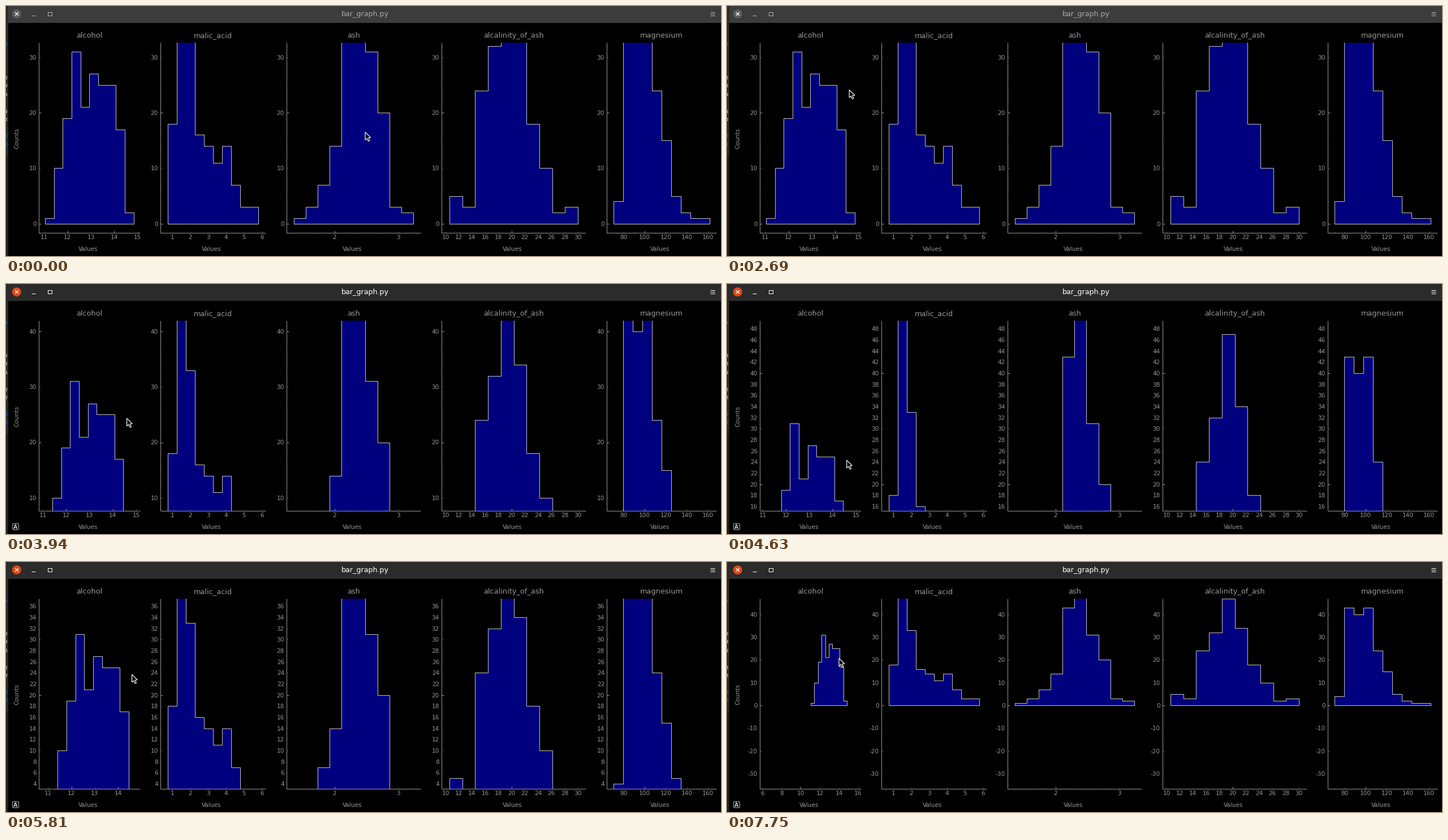
A matplotlib script for the animation above (8 s loop, 1264 by 443 pixels).

```python
import math

import numpy as np
import matplotlib.pyplot as plt
from matplotlib.animation import FuncAnimation
from matplotlib.collections import LineCollection
from matplotlib.patches import Circle, FancyBboxPatch, Polygon, Rectangle

W, H, DPI = 1264, 443, 64
FRAMES, INTERVAL = 200, 40
TICK_MS = 62.5                 # the screen is refreshed 16 times a second
PT = 72 / DPI                  # points per pixel
UI = 0.878                     # display scale of the window
TOP, BOTTOM = 64.5, 402
ZERO_Y, COUNT_PX = 385.7, 9.833
GREY = "#969696"
SMALL, TITLE = 12 * UI, 14.67 * UI

GRAB, RELEASE = 50, 103        # ticks of the drag
ZOOM_AT = (199, 169)
WHEEL_TICKS = range(118, 125, 3)
LAG = 0.3                      # the pointer is drawn slightly late

# pointer moves: start tick, end tick, x, y
START = (635, 223)
MOVES = [
    (15, 28, 443, 226), (29, 43, 216, 148),
    (50, 63, 213.5, 239.5), (63, 74, 211.5, 313.7), (74, 80, 212, 341),
    (82, 93, 222.8, 194.7), (93, 103, 221.3, 138.8),
    (111, 114, 198, 166), (117, 124, 198, 170),
]

# title, axis left and right, inset of the data, data range, counts per bin
PLOTS = [
    ("alcohol", 58, 236.5, 11, (11.03, 14.83),
     [1, 10, 19, 31, 21, 27, 25, 25, 17, 2]),
    ("malic_acid", 273, 459, 12.6, (0.74, 5.8),
     [18, 59, 33, 16, 14, 11, 14, 7, 3, 3]),
    ("ash", 496, 732.6, 12.7, (1.36, 3.23),
     [1, 3, 7, 14, 43, 54, 31, 20, 3, 2]),
    ("alcalinity_of_ash", 770, 1025, 14.1, (10.6, 30),
     [5, 3, 24, 32, 47, 34, 18, 10, 2, 3]),
    ("magnesium", 1062, 1256, 11.7, (70, 162),
     [4, 43, 40, 43, 24, 15, 5, 2, 1, 1]),
]

fig = plt.figure(figsize=(W / DPI, H / DPI), dpi=DPI, facecolor="black")
ax = fig.add_axes([0, 0, 1, 1])
ax.set_xlim(0, W)
ax.set_ylim(H, 0)
ax.axis("off")


def hand(k):
    """Pointer position: steady through waypoints, slowing before a stop."""
    pos = np.array(START, float)
    for n, (begin, end, x, y) in enumerate(MOVES):
        if k <= begin:
            break
        u = min(1, (k - begin) / (end - begin))
        if n + 1 == len(MOVES) or MOVES[n + 1][0] > end:
            u *= 2 - u
        pos += (np.array((x, y)) - pos) * u
    return pos


def write(x, y, s, px, color=GREY, ha="center", **kw):
    return ax.text(x, y, s, fontsize=px * PT, color=color, ha=ha,
                   va="baseline", family="DejaVu Sans", **kw)


def segments(lines, color, width=1.0, z=3):
    art = LineCollection(lines, colors=color, linewidths=width * PT, zorder=z)
    ax.add_collection(art, autolim=False)
    return art


def rect(x, y, w, h, color, z=1):
    return ax.add_patch(Rectangle((x, y), w, h, fc=color, lw=0, zorder=z))


def tick_steps(span, size):
    """Spacing of the tick levels, coarse to fine."""
    best = span / max(2, math.log(size / UI))
    unit = 10 ** math.floor(math.log10(best))
    steps = [unit * m for m in (1, 2, 10, 20, 100)]
    first = 1 if steps[1] <= best else 0
    levels = [steps[first + 2], steps[first + 1]]
    if span / steps[first] <= 20:
        levels.append(steps[first])
    return levels


def too_dense(shown, fill):
    return any(shown >= n and fill >= 0.8 - n / 10 for n in (0, 2, 4, 6))


def text_width(s):
    return 6.7 * len(s.replace(".", "")) + 3.3 * s.count(".")


class Axis:
    """Axis line with inward ticks; labels come from a pool of texts."""

    def __init__(self, pos, start, end, upright):
        self.pos, self.start, self.end = pos, start, end
        self.upright = upright
        segments([[self.point(start), self.point(end)]], GREY)
        self.ticks = segments([], GREY)
        self.pool = []

    def point(self, at, inward=0):
        if self.upright:
            return self.pos + inward, at
        return at, self.pos - inward

    def label(self, n, at, s):
        if n == len(self.pool):
            self.pool.append(write(0, 0, "", SMALL,
                                   ha="right" if self.upright else "center"))
        text = self.pool[n]
        text.set_text(s)
        text.set_visible(True)
        text.set_position((self.pos - 4, at + 3.9) if self.upright
                          else (at, self.pos + 11))

    def update(self, origin, scale):
        lo, hi = sorted(((self.start - origin) / scale,
                         (self.end - origin) / scale))
        size = abs(self.end - self.start)
        seen, lines, colors = set(), [], []
        shown, used, labelling = 0, 0, True
        for level, step in enumerate(tick_steps(hi - lo, size)):
            values = [round(j * step, 6) for j in
                      range(math.ceil(lo / step), math.floor(hi / step) + 1)]
            values = [v for v in values if v not in seen]
            seen.update(values)
            spots = [origin + v * scale for v in values]
            names = [f"{v:g}" for v in values]
            length = 5 * UI / (1 + level / 2)
            lines += [[self.point(p), self.point(p, length)] for p in spots]
            colors += [(0.59, 0.59, 0.59, 1 / (level + 1))] * len(spots)
            used += sum(10 if self.upright else text_width(s) for s in names)
            if level and too_dense(shown, used / size):
                labelling = False
            if labelling:
                for p, s in zip(spots, names):
                    self.label(shown, p, s)
                    shown += 1
        for text in self.pool[shown:]:
            text.set_visible(False)
        self.ticks.set_segments(lines)
        self.ticks.set_color(colors)


class Plot:
    def __init__(self, title, left, right, inset, data, counts):
        self.left = left
        self.scale = (right - left - 2 * inset) / (data[1] - data[0])
        self.origin = left + inset - data[0] * self.scale
        edges = np.linspace(*data, len(counts) + 1)
        self.xs = np.repeat(edges, 2)
        self.ys = np.concatenate([[0], np.repeat(counts, 2), [0]])
        self.shape = ax.add_patch(Polygon(
            [(0, 0), (1, 1)], fc="#00007f", ec="#cccccc", lw=0.95 * PT,
            joinstyle="miter", zorder=2))
        self.shape.set_clip_path(Rectangle(
            (left, TOP), right - left, BOTTOM - TOP, transform=ax.transData))
        self.xaxis = Axis(BOTTOM, left, right, False)
        self.yaxis = Axis(left, TOP, BOTTOM, True)
        mid = (left + right) / 2
        write(mid, 55.6, title, TITLE)
        write(mid - 2.5, 434, "Values", SMALL)
        self.xaxis.update(self.origin, self.scale)

    def update(self, zero, unit, dx=0, zoom=1):
        """Redraw and return the mapping of the x axis."""
        origin = ZOOM_AT[0] + (self.origin + dx - ZOOM_AT[0]) * zoom
        scale = self.scale * zoom
        self.shape.set_xy(np.column_stack(
            [origin + scale * self.xs, zero - unit * self.ys]))
        self.yaxis.update(zero, -unit)
        return origin, scale


class TitleBar:
    def __init__(self):
        self.bar = rect(4, 0, W - 4, 29.5, "#3c3c3c")
        self.name = write(634.5, 18, "bar_graph.py", 12.6)
        self.close = ax.add_patch(Circle((18.8, 14), 8, lw=0, zorder=3))
        segments([[(16, 11), (22, 17)], [(16, 17), (22, 11)]], "white", 1.3, 4)
        square = [(74, 11), (81, 11), (81, 17), (74, 17), (74, 11)]
        menu = [[(1245, y), (1253, y)] for y in (10.6, 13.6, 16.6)]
        self.icons = segments([[(45, 16.5), (52, 16.5)], square] + menu, "white")

    def update(self, focused):
        self.bar.set_facecolor("#2b2b2b" if focused else "#3c3c3c")
        self.close.set_facecolor("#dd4814" if focused else "#5c5c5c")
        self.name.set_color("white" if focused else "#a8a8a8")
        self.icons.set_color("white" if focused else "#b4b4b4")


class AutoButton:
    """Small 'A' in the corner of the plot under the pointer."""

    def __init__(self):
        self.box = ax.add_patch(FancyBboxPatch(
            (0, 425), 10, 10, boxstyle="round,pad=0.5,rounding_size=2",
            fc="none", ec="#b4b4b4", lw=PT, zorder=4))
        self.letter = write(0, 433.6, "A", 9.5, "#c8c8c8", weight="bold")

    def update(self, x):
        for art in (self.box, self.letter):
            art.set_visible(x is not None)
        if x is not None:
            self.box.set_x(x - 5)
            self.letter.set_x(x)


def button_place(k, x):
    if k > GRAB:
        return 17
    if k <= MOVES[0][0] or x < 243:
        return None
    return plots[2 if x >= 466 else 1].left - 24


# strip of the window behind
rect(0, 0, 3.5, 266, "#2a2b27")
rect(0, 266, 3.5, H - 266, "#1f1f1d")
for y in (127, 141, 157, 187, 201):
    rect(0, y - 3, 1.5, 6, "#8a8072", 2)
for y in (68, 230, 244):
    rect(0, y - 2, 1.5, 5, "#1f4f88", 2)

bar = TitleBar()
plots = [Plot(*p) for p in PLOTS]
button = AutoButton()
write(22, 234, "Counts", SMALL, rotation=90, rotation_mode="anchor")

ARROW = np.array([(0, 0.6), (0, 14.4), (3.2, 11.6), (5.5, 16.6),
                  (7.9, 15.6), (5.6, 10.6), (9.8, 10.2)])
pointer = ax.add_patch(Polygon(ARROW, fc="#101010", ec="white", lw=1.15 * PT,
                               joinstyle="miter", zorder=9))


def update(i):
    k = int((i * INTERVAL + 32) / TICK_MS)
    dx, dy = hand(min(max(k, GRAB), RELEASE)) - hand(GRAB)
    zoom = 1.02 ** (-15 * sum(k >= t for t in WHEEL_TICKS))
    zero = ZOOM_AT[1] + (ZERO_Y + dy - ZOOM_AT[1]) * zoom
    unit = COUNT_PX * zoom

    first = plots[0]
    first.xaxis.update(*first.update(zero, unit, dx, zoom))
    for plot in plots[1:]:
        plot.update(zero, unit)
    tip = hand(k - LAG)
    bar.update(k > GRAB)
    button.update(button_place(k, tip[0]))
    pointer.set_xy(ARROW + tip)
    return []


anim = FuncAnimation(fig, update, frames=FRAMES, interval=INTERVAL,
                     repeat=True, repeat_delay=0, blit=False)
plt.show()
```
